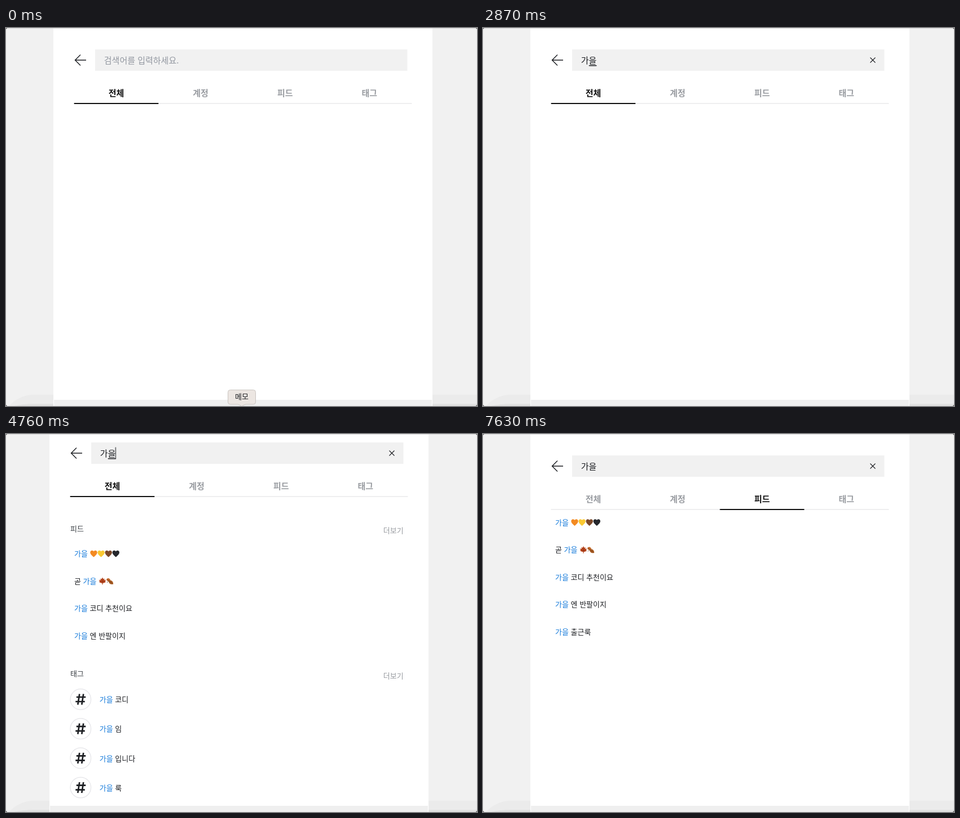
Animation of 835 by 671 pixels, one loop 8000 ms. Source, as an HTML page:

```html
<!DOCTYPE html>
<html lang="ko">
<head>
<meta charset="utf-8">
<title>검색</title>
<style>
  html, body { margin: 0; width: 100%; height: 100%; overflow: hidden; background: #f1f1f1; }
  svg { display: block; width: 835px; height: 671px; font: 13px "Noto Sans CJK KR", "Noto Sans CJK", sans-serif; fill: #1b1d21; }
  .field { font-size: 15px; }
  .hint { fill: #9297a0; }
  .tab { font-size: 15px; font-weight: 700; text-anchor: middle; fill: #999ca1; }
  .head { fill: #3c4046; }
  .more { fill: #999ca1; text-anchor: end; }
  .hit { fill: #187cdb; }
  .line { fill: none; stroke: #1b1d21; }
</style>
</head>
<body>
<svg viewBox="0 0 835 671">
  <defs>
    <path id="heart" d="M0 6C-2.5 4-6.2 1-6.2-2.2C-6.2-4.6-4.6-5.8-3-5.8C-1.6-5.8-.5-5 0-4C.5-5 1.6-5.8 3-5.8C4.6-5.8 6.2-4.6 6.2-2.2C6.2 1 2.5 4 0 6Z"/>
    <g id="maple">
      <path d="M0-6.5L1.5-3.5L3.5-4.5L3.2-1.5L6.2-2L4.8.5L6 1.8L2.5 3.4L.6 3.6V6.2H-.6V3.6L-2.5 3.4L-6 1.8L-4.8.5L-6.2-2L-3.2-1.5L-3.5-4.5L-1.5-3.5Z" fill="#b8451d"/>
      <path d="M0-4V4M0 2L-4-.5M0 2L4-.5" fill="none" stroke="#8a2e14" stroke-width=".7"/>
    </g>
    <g id="leaves">
      <path d="M-6-3C-4-6.5 0-5.5 1.5-1C-2 1.5-5.5.5-6-3Z" fill="#c46a2c"/>
      <path d="M-2 0C2-2.5 6-.5 6.2 5.5C1.5 6.5-2 4.5-2 0Z" fill="#a85b22"/>
      <path d="M-4.5-3L4.5 4.5M-2 0L-5 3" fill="none" stroke="#6e3c17" stroke-width=".8"/>
    </g>
    <g id="hash">
      <circle r="18.3" fill="#fff" stroke="#e4e4e8" stroke-width="1.2"/>
      <path class="line" stroke-width="2.7" d="M-7.5-4H9M-9 4H7.5M-2-9.5L-5 9.5M5-9.5L2 9.5"/>
    </g>
  </defs>

  <rect width="835" height="671" fill="#f1f1f1"/>
  <path d="M5 671C17 658 32 651 50 651H835V671Z" fill="#ebebeb"/>
  <path d="M14 671Q30 667 52 667H835V671Z" fill="#e1e1e1"/>

  <g id="shift">
    <rect x="84" width="672" height="671" fill="#fff"/>
    <g id="scroll">
      <path class="line" stroke-width="1.4" d="M142 57H123M132 47.5L122.5 57L132 66.5"/>
      <rect x="158" y="38" width="553.5" height="38" fill="#f1f1f1"/>
      <g id="field" class="field"></g>
      <path id="clear" class="line" stroke-width="1.1" d="M686.5 52.5L695.5 61.5M695.5 52.5L686.5 61.5"/>
      <rect id="caret" x="173.6" y="46.5" width="1.1" height="21"/>
      <rect x="120.5" y="133.3" width="599" height="1.4" fill="#e8e8ea"/>
      <rect id="bar" x="120.7" y="133" width="149.6" height="2" fill="#111"/>
      <g id="tabs"></g>
      <g id="all">
        <text class="head" x="121" y="195.5">피드</text>
        <text class="more" x="711.7" y="199.3">더보기</text>
        <text class="head" x="121" y="452.8">태그</text>
        <text class="more" x="711.7" y="456.5">더보기</text>
      </g>
      <g id="tagView"></g>
      <g id="feedView"></g>
    </g>
    <rect x="85" y="660" width="670" height="11" fill="#ececec" opacity=".8"/>
  </g>

  <g id="tip">
    <path d="M397.500 642.500H438.500Q442.500 642.500 442.500 646.500V664Q442.500 668 438.500 668H425Q421.500 668.500 418 672Q414.500 668.500 411 668H397.500Q393.500 668 393.500 664V646.500Q393.500 642.500 397.500 642.500Z" fill="#ece6e2" stroke="#c9c4c0"/>
    <text x="418" y="659.3" text-anchor="middle">메모</text>
  </g>

  <rect width="835" height="1" fill="#d8d8d8"/>
  <path d="M0 0H3Q0 0 0 3ZM835 0H832Q835 0 835 3ZM0 671H3Q0 671 0 668ZM835 671H832Q835 671 835 668Z" fill="#222"/>
</svg>

<script>
const LOOP = 8000;
const $ = id => document.getElementById(id);
const rules = [];

// Stepped CSS animation of one property: steps are [ms, value] pairs.
function track(id, prop, steps) {
  const frames = steps.map(([ms, v]) => `${ms / LOOP * 100}% { ${prop}: ${v}; }`).join(' ');
  rules.push(`@keyframes ${id} { ${frames} 100% { ${prop}: ${steps[steps.length - 1][1]}; } }
    #${id} { animation: ${id} ${LOOP}ms step-end infinite; }`);
}

function show(id, from, to = LOOP) {
  const steps = from ? [[0, 'hidden'], [from, 'visible']] : [[0, 'visible']];
  if (to < LOOP) steps.push([to, 'hidden']);
  track(id, 'visibility', steps);
}

const add = (id, markup) => $(id).insertAdjacentHTML('beforeend', markup);
const sprite = (name, x, y, fill = '') =>
  `<use href="#${name}" transform="translate(${x} ${y})" fill="${fill}"/>`;

// An asterisk marks where the highlighted search word stands.
const line = (text, x, y) =>
  `<text x="${x}" y="${y + 4.8}">${text.replace('*', '<tspan class="hit">가을</tspan>')}</text>`;

const feeds = ['*', '곧 *', '* 코디 추천이요', '* 엔 반팔이지', '* 출근룩'];
const tags = ['* 코디', '* 임', '* 입니다', '* 룩', '*'];
const hearts = ['#f38a22', '#fbc932', '#7b4728', '#25272c'];

function addFeeds(id, top, count) {
  feeds.slice(0, count).forEach((text, i) => add(id, line(text, 128, top + i * 48.45)));
  hearts.forEach((fill, i) => add(id, sprite('heart', 162.5 + i * 13.1, top, fill)));
  add(id, sprite('maple', 178, top + 48.5) + sprite('leaves', 191, top + 48.5));
}

function addTags(id, top, count) {
  tags.slice(0, count).forEach((text, i) => {
    const y = top + i * 52.2;
    add(id, sprite('hash', 139.3, y) + line(text, 172.8, y + 0.3));
  });
}

addFeeds('all', 235.5, 4);
addTags('all', 494, 4);
addTags('tagView', 173.3, 5);
addFeeds('feedView', 157, 5);
show('all', 3080, 6090);
show('tagView', 6160, 7630);
show('feedView', 7630);

// Typing: text, start, end, index of the underlined syllable.
[
  ['검색어를 입력하세요.', 0, 1890, -1],
  ['ㄱ', 1890, 1960, 0],
  ['가', 1960, 2170, 0],
  ['강', 2170, 2240, 0],
  ['가으', 2240, 2380, 1],
  ['가을', 2380, 6020, 1],
  ['가을', 6020, LOOP, -1]
].forEach(([text, from, to, mark], i) => {
  const under = mark < 0 ? '' : `<rect x="${174 + mark * 13.8}" y="66" width="13.6" height="1.5"/>`;
  add('field', `<g id="typed${i}"><text x="173.8" y="63"${i ? '' : ' class="hint"'}>${text}</text>${under}</g>`);
  show('typed' + i, from, to);
});
show('clear', 1890);

const blinks = [0, 770, 1260, 1820, 2870, 3430, 3990, 4480, 5040, 5530, 6020];
track('caret', 'visibility', blinks.map((ms, i) => [ms, i % 2 ? 'visible' : 'hidden']));
rules.push(`@keyframes advance { 0% { transform: none; }
    ${1890 / 80}% { transform: translateX(13.8px); }
    ${2240 / 80}%, 100% { transform: translateX(27.2px); } }
  #caret { animation: caret ${LOOP}ms step-end infinite, advance ${LOOP}ms step-end infinite !important; }`);

const ON = '#111', OFF = '#999ca1';
const tabSteps = [
  [[0, ON], [6090, OFF]],
  [[0, OFF]],
  [[0, OFF], [7630, ON]],
  [[0, OFF], [6090, ON], [7630, OFF]]
];
['전체', '계정', '피드', '태그'].forEach((name, i) => {
  add('tabs', `<text id="tab${i}" class="tab" x="${195.5 + i * 149.6}" y="121">${name}</text>`);
  track('tab' + i, 'fill', tabSteps[i]);
});

const moveX = px => `translateX(${px}px)`;
const moveY = px => `translateY(${px}px)`;
track('bar', 'transform', [[0, moveX(0)], [6090, moveX(448.6)], [7630, moveX(299.2)]]);
track('shift', 'transform', [[0, moveX(0)], [3080, moveX(-7)], [6090, moveX(0)]]);
track('scroll', 'transform', [[0, moveY(0)], [4690, moveY(-6)], [4760, moveY(-23)],
  [4830, moveY(-40)], [4900, moveY(-47.5)], [6090, moveY(0)]]);
track('tip', 'opacity', [[0, 1], [140, .8], [210, .6], [280, .4], [350, .2], [420, 0]]);

const style = document.createElement('style');
style.textContent = rules.join('\n');
document.head.append(style);
</script>
</body>
</html>
```
